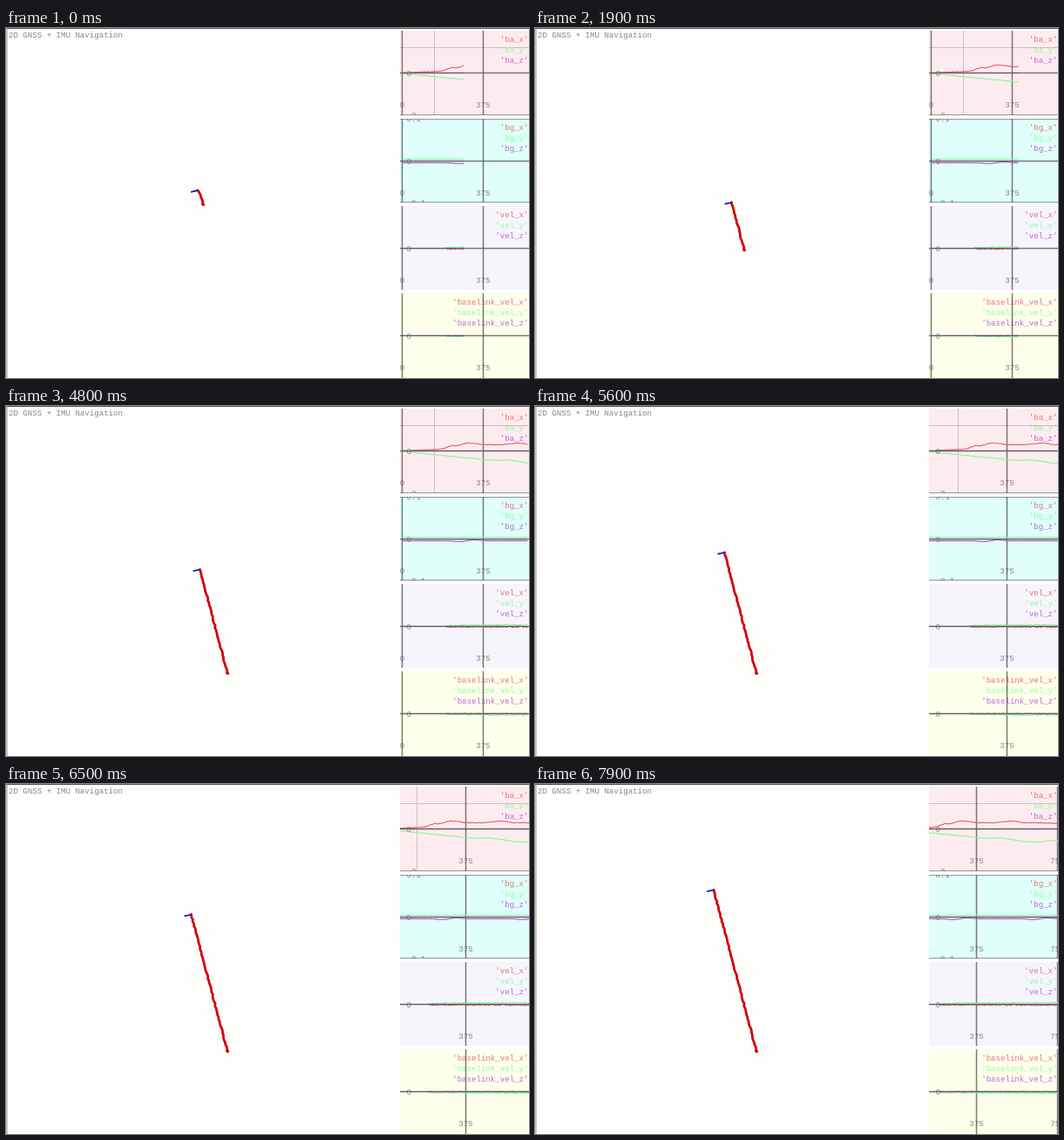
An HTML page that plays this animation: 600x401 px, repeating every 8000 ms.

```html
<!DOCTYPE html>
<html lang="en">
<head>
<meta charset="utf-8">
<title>2D GNSS + IMU Navigation</title>
<style>
  html, body { margin: 0; width: 100%; height: 100%; overflow: hidden; background: #fefefd; }
  svg { display: block; }
  text { font: 9.1px "Liberation Mono", "DejaVu Sans Mono", monospace; fill: #888; white-space: pre; }
  .legend { text-anchor: end; opacity: 0.85; }
  .mid { text-anchor: middle; }
  .axis { stroke: #555; stroke-width: 1.5; stroke-opacity: 0.78; }
  .grid { stroke: #cdbfc2; stroke-width: 1; }
  polyline { fill: none; stroke-linejoin: round; }
</style>
</head>
<body>
<svg id="stage" width="600" height="401" viewBox="0 0 600 401"></svg>
<script>
const LOOP = 8000, STEP = 100;
const ZERO = 48.5, ORIGIN = 2.5, TICK = 93, VIEW = 150, SAMPLES = 195;
const COLORS = ['#e2606c', '#84fb98', '#b052d8'];
const RED = '#d2000f';
const stage = document.getElementById('stage');

function add(parent, tag, attrs, label) {
  const el = document.createElementNS('http://www.w3.org/2000/svg', tag);
  for (const key in attrs) el.setAttribute(key, attrs[key]);
  if (label) el.textContent = label;
  parent.appendChild(el);
  return el;
}

function line(parent, cls, x1, y1, x2, y2) {
  return add(parent, 'line', { class: cls, x1, y1, x2, y2 });
}

// Seeded noise between -0.5 and 0.5
function random(seed) {
  return () => {
    seed = (seed * 16807) % 2147483647;
    return seed / 2147483647 - 0.5;
  };
}

const linear = (s, from, to) => Math.max(0, Math.min(1, (s - from) / (to - from)));
const smooth = (s, from, to) => {
  const k = linear(s, from, to);
  return k * k * (3 - 2 * k);
};
const swing = d => -0.2 * d * Math.exp(-d * d / 128);

// Each curve gives its offset from zero at sample s
const baX = s => -2 * linear(s, 0, 46) - 4 * smooth(s, 44, 58) - 3 * smooth(s, 60, 76)
  + 1.8 * smooth(s, 78, 95) - 1.7 * smooth(s, 110, 134) + 1.8 * smooth(s, 134, 150)
  + 1.4 * smooth(s, 170, 195);
const baY = s => 0.5 + 10 * linear(s, 0, 100) + 4.3 * smooth(s, 120, 155) - 1.5 * smooth(s, 163, 180);
const bgZ = s => 1.9 + swing(s - 74) + swing(s - 166);
const flat = y => () => y;
const moving = y => s => y * (0.7 * linear(s, 50, 56) + 0.5 * linear(s, 56, SAMPLES));

// Noise is given per axis; the velocities shake only once the vehicle moves
const PANELS = [
  { name: 'ba', top: 3, height: 97, fill: '#fdecef', curves: [baX, baY, flat(0)], noise: [0.8, 0.8, 0] },
  { name: 'bg', top: 104, height: 96, fill: '#e0fefa', curves: [flat(0), flat(-2.2), bgZ], noise: [0, 0, 0.2] },
  { name: 'vel', top: 204, height: 96, fill: '#f5f5fb', curves: [moving(0.6), moving(-1.8), flat(0)], noise: [1.7, 1.3, 0.5], rest: 50 },
  { name: 'baselink_vel', top: 304, height: 97, fill: '#fdffeb', curves: [flat(0), moving(1.5), flat(0)], noise: [0.5, 1.6, 0.4], rest: 50 }
];

const reveal = add(add(stage, 'clipPath', { id: 'reveal' }), 'rect', { x: 0, y: -60, width: 0, height: 120 });
const scrollers = [];

function levelTick(box, y, label) {
  add(box, 'text', { x: 7.5, y: y + 3 }, label);
  line(box, 'axis', 0, y, 148, y);
}

function drawCurve(parent, curve, noise, rest, color, seed) {
  const rand = random(seed);
  const points = [];
  for (let s = 0; s <= SAMPLES; s++) {
    const shake = s > rest ? rand() * noise : 0;
    points.push(`${s},${(curve(s) + shake).toFixed(2)}`);
  }
  add(parent, 'polyline', { points: points.join(' '), stroke: color, 'stroke-width': 1.1 });
}

function buildPanel({ name, top, height, fill, curves, noise, rest = 0 }, index) {
  const box = add(stage, 'svg', { x: 452, y: top, width: 148, height });
  add(box, 'rect', { width: 148, height, fill });
  const layer = add(box, 'g');
  if (name === 'ba') {
    line(layer, 'grid', 37, 0, 37, height);
    line(box, 'grid', 0, 19.5, 148, 19.5);
    levelTick(box, 97, '-2');
  }
  if (name === 'bg') {
    levelTick(box, 0, '0.1');
    levelTick(box, 96, '-0.1');
  }
  ['x', 'y', 'z'].forEach((axis, i) =>
    add(box, 'text', { class: 'legend', x: 147.5, y: 13 + i * 12, style: `fill:${COLORS[i]}` }, `'${name}_${axis}'`));

  const front = add(box, 'g');
  for (let i = 0; i < 3; i++) {
    add(layer, 'text', { class: 'mid', x: i * TICK, y: 88.2 }, String(i * 375));
    line(front, 'axis', i * TICK, 0, i * TICK, height);
  }
  const plot = add(front, 'g', { transform: `translate(0 ${ZERO})` });
  const clipped = add(plot, 'g', { 'clip-path': 'url(#reveal)' });
  curves.forEach((curve, i) => drawCurve(clipped, curve, noise[i], rest, COLORS[i], 97 + index * 31 + i * 7));
  levelTick(box, ZERO, '0');
  scrollers.push(layer, front);
}

PANELS.forEach(buildPanel);
add(stage, 'rect', { width: 600, height: 1, fill: '#555' });
add(stage, 'rect', { x: 0.5, width: 1, height: 401, fill: '#888' });
add(stage, 'text', { x: 3, y: 11 }, '2D GNSS + IMU Navigation');

// Nearly straight run: it picks up speed for a while in the middle
const SLOPE = 0.265;
const travelled = t => 16 + 19.7 * t + 3 * linear(t, 0, 8) + 10 * smooth(t, 3.4, 5.8);

// The view recentres by one fixed step at these seconds
const RECENTRE = [1.8, 4.4];

const rand = random(4211);
const wobble = Array.from({ length: 80 }, () => rand() * 1.2);
const map = add(stage, 'g');
const trail = add(map, 'polyline', { stroke: RED, 'stroke-width': 2.8, 'stroke-linecap': 'round' });
add(map, 'circle', { cx: 0.4, cy: 0.3, r: 1.7, fill: RED });
const heading = add(map, 'line', { stroke: '#1c1cb4', 'stroke-width': 1.8 });

function draw(t) {
  const steps = RECENTRE.filter(s => t >= s).length;
  map.setAttribute('transform', `translate(${226 + 14 * steps} ${202 + 52 * steps})`);

  const far = travelled(t);
  const x = -SLOPE * far - 1.7 * Math.exp(-2 * t);
  const points = [];
  for (let d = 0, i = 0; d < far - 2; d += 2.6, i++) {
    points.push(`${(-SLOPE * d + wobble[i]).toFixed(2)},${-d}`);
  }
  points.push(`${x},${-far}`);
  trail.setAttribute('points', points.join(' '));
  const ends = { x1: x, y1: -far, x2: x - 8, y2: 1.8 - far };
  for (const key in ends) heading.setAttribute(key, ends[key]);

  const length = 71 + 15.2 * t;
  const scroll = Math.round(Math.max(0, length - VIEW));
  reveal.setAttribute('width', length);
  for (const group of scrollers) group.setAttribute('transform', `translate(${ORIGIN - scroll} 0)`);
}

const start = performance.now();
function tick() {
  const time = (performance.now() - start) % LOOP;
  draw(Math.floor(time / STEP) * STEP / 1000);
  requestAnimationFrame(tick);
}
tick();
</script>
</body>
</html>
```
